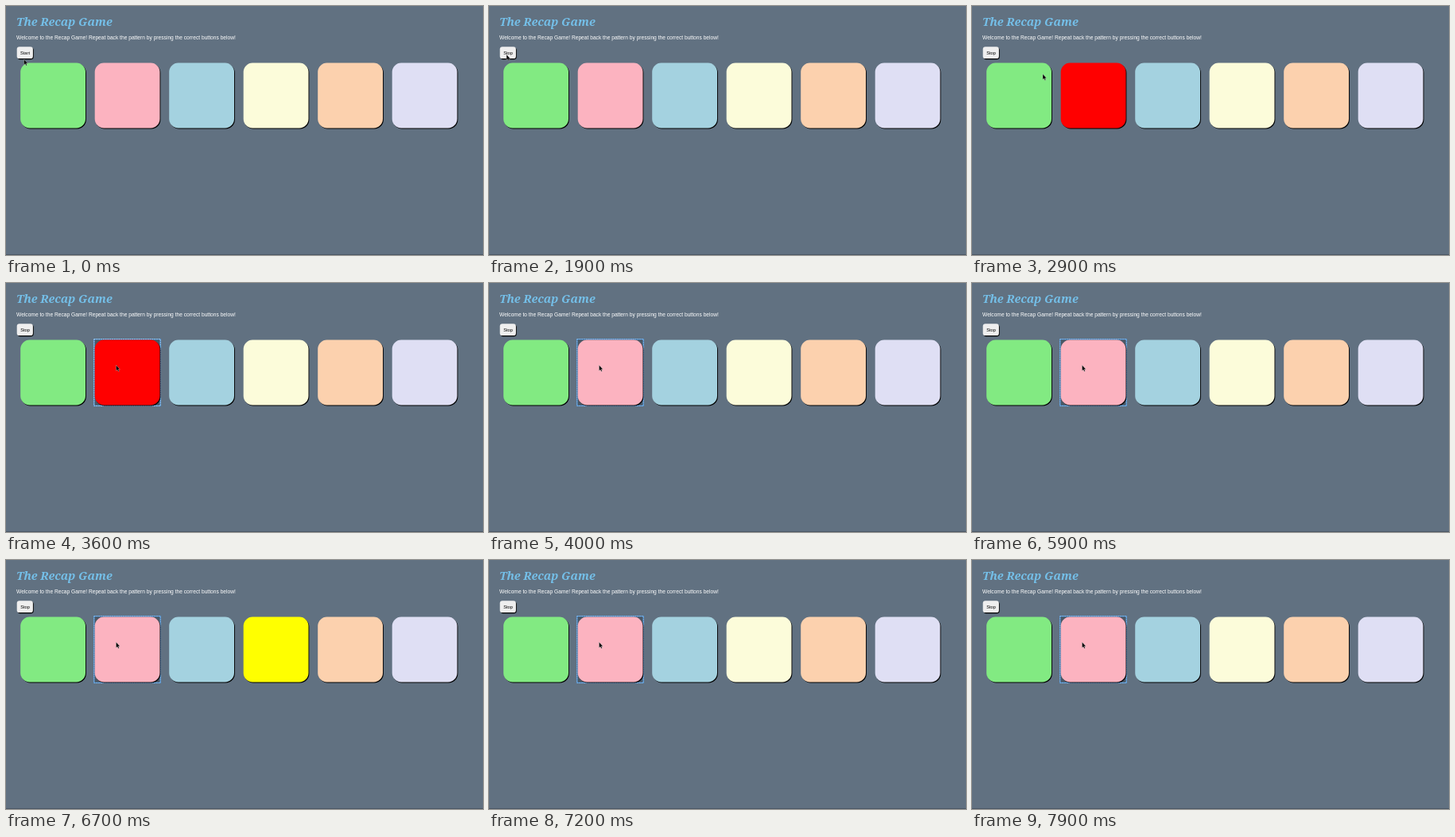
Recreate the animation shown at these times as an HTML page. Size 600 by 313 pixels, loop 8000 ms.

```html
<!DOCTYPE html>
<html lang="en">
<head>
<meta charset="utf-8">
<title>The Recap Game</title>
<style>
  html, body { margin: 0; width: 100%; height: 100%; overflow: hidden; background: #617181; }
  svg { display: block; width: 600px; height: 313px; }
  text { font-family: "Liberation Sans", Arial, sans-serif; }
  .title { font: italic bold 14.4px "Noto Serif", Georgia, serif; fill: #74bfe8; }
</style>
</head>
<body>
<svg id="stage" viewBox="0 0 600 313">
  <rect width="600" height="313" fill="#617181"/>
  <rect y="312" width="600" height="1" fill="#4a5764"/>
  <text class="title" x="13" y="25">The Recap Game</text>
  <text x="13" y="42.2" font-size="6.67" fill="#fff">Welcome to the Recap Game! Repeat back the pattern by pressing the correct buttons below!</text>
  <rect x="14.4" y="52.2" width="20.4" height="15" rx="3.4" fill="#000"/>
  <rect x="13.7" y="51.3" width="20.2" height="14.8" rx="3.2" fill="#efefef"/>
  <text id="label" x="24" y="60.8" font-size="5.7" text-anchor="middle">Start</text>
  <g id="focus" visibility="hidden">
    <rect x="110.8" y="70.6" width="83.4" height="83.8" fill="#4a5866" stroke="#4f96dc" stroke-width="1.2"/>
    <rect id="dashes" x="110.8" y="70.6" width="83.4" height="83.8" fill="none" stroke="#b4dcfa" stroke-width=".9" stroke-dasharray="1.6 1.2"/>
  </g>
  <g id="pads"></g>
  <path id="cursor" d="M0 0V7L1.6 5.6L2.7 8L3.8 7.5L2.8 5.2H4.8Z" fill="#000" stroke="#ddd" stroke-width=".35"/>
</svg>
<script>
const LOOP = 8000, STEP = 100;
const RED = 1, YELLOW = 3;
const START_CLICK = 1100, GUESS_CLICK = 3600;
const $ = id => document.getElementById(id);

const colors = ['#82ea82', '#fcb3c0', '#a4d2e0', '#fcfcda', '#fcd1ae', '#dfdff4'];
const litColors = { [RED]: '#ff0000', [YELLOW]: '#ffff00' };
const lit = [
  { pad: RED, from: 2100, to: 3100 },
  { pad: RED, from: GUESS_CLICK, to: 3900 },
  { pad: RED, from: 4900, to: 5800 },
  { pad: YELLOW, from: 6200, to: 7100 }
];
const path = [
  [400, 22.6, 67], [1000, 22, 61], [2500, 22, 61],
  [2900, 89, 85.5], [3300, 138.5, 103.3], [LOOP, 138.5, 103.3]
];

function addRect(x, y, fill) {
  const rect = document.createElementNS('http://www.w3.org/2000/svg', 'rect');
  const attrs = { x, y, width: 81.8, height: 81.8, rx: 11.5, fill };
  for (const key in attrs) rect.setAttribute(key, attrs[key]);
  return $('pads').appendChild(rect);
}

const pads = colors.map((color, i) => {
  const x = 18.2 + i * 93.5;
  addRect(x + 0.9, 72.6, '#000');
  return addRect(x, 71.6, color);
});

function cursorAt(t) {
  const next = path.findIndex(p => p[0] > t);
  if (next === 0) return path[0].slice(1);
  const [t0, x0, y0] = path[next - 1], [t1, x1, y1] = path[next];
  const k = (t - t0) / (t1 - t0);
  return [x0 + (x1 - x0) * k, y0 + (y1 - y0) * k];
}

function draw(time) {
  const t = Math.floor((time % LOOP) / STEP) * STEP;
  const active = lit.find(s => t >= s.from && t < s.to);
  pads.forEach((pad, i) =>
    pad.setAttribute('fill', active && active.pad === i ? litColors[i] : colors[i]));
  $('label').textContent = t < START_CLICK ? 'Start' : 'Stop';
  $('focus').setAttribute('visibility', t < GUESS_CLICK ? 'hidden' : 'visible');
  $('dashes').setAttribute('stroke-opacity', active && active.pad === RED ? 1 : 0.6);
  $('cursor').setAttribute('transform', `translate(${cursorAt(t)})`);
}

const began = performance.now();
function tick() {
  draw(performance.now() - began);
  requestAnimationFrame(tick);
}
tick();
</script>
</body>
</html>
```
